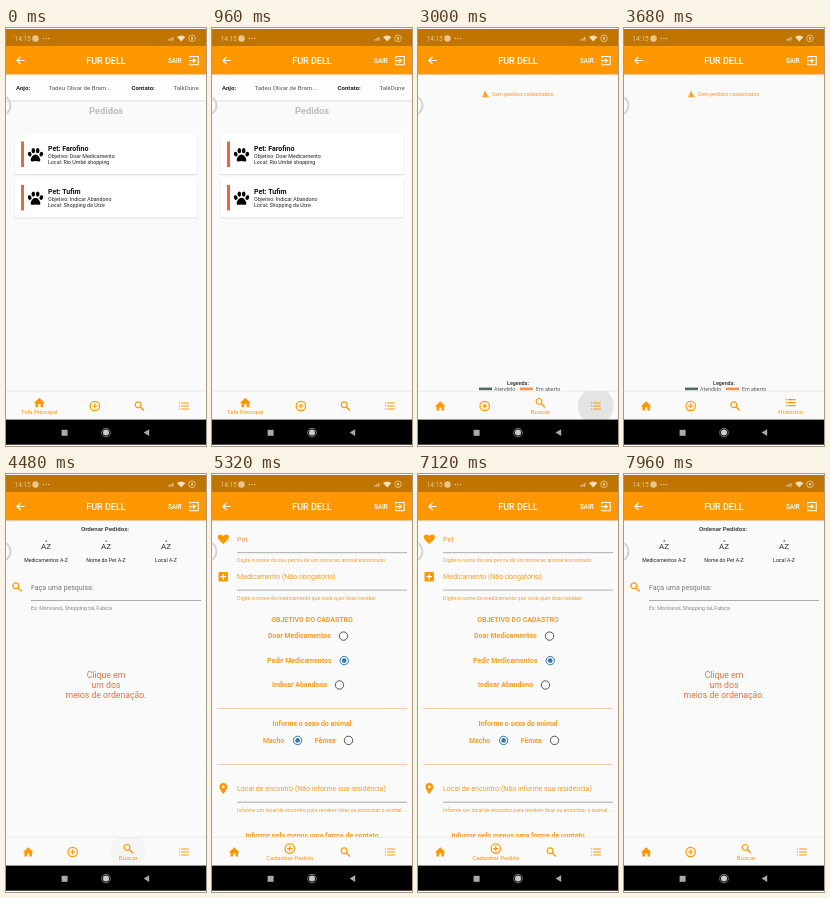
An HTML page that plays this animation: 200x418 px, repeating every 8 s.

```html
<!DOCTYPE html>
<html lang="pt-BR">
<head>
<meta charset="utf-8">
<title>Pedidos</title>
<style>
  html, body { margin: 0; width: 100%; height: 100%; overflow: hidden; background: #fafafa; }
  svg { display: block; width: 100%; height: 100%; font-family: Roboto, "Open Sans", sans-serif; }
</style>
</head>
<body>
<svg id="stage" viewBox="0 0 200 418" preserveAspectRatio="none"></svg>
<script>
const ORANGE = '#ff9800', LABEL = '#f39e25', DARK = '#222';
const LOOP = 8000;
const TABS = ['Tela Principal', 'Cadastrar Pedido', 'Buscar', 'Histórico'];
const [HOME, ADD, SEARCH, LIST] = [0, 1, 2, 3];
const TAPS = [[1360, ADD], [2080, SEARCH], [2800, LIST], [4120, SEARCH],
              [4920, ADD], [5780, HOME], [6440, ADD], [7260, SEARCH]];
const PAGE_DELAY = 160, NAV_DELAY = 210, NAV_TIME = 120;

const text = (x, y, size, str, fill = DARK, weight = 400, anchor = 'start') =>
  `<text x="${x}" y="${y}" font-size="${size}" fill="${fill}" font-weight="${weight}" text-anchor="${anchor}">${str}</text>`;
const middle = (x, y, size, str, fill, weight) => text(x, y, size, str, fill, weight, 'middle');
const rect = (x, y, w, h, fill, extra = '') =>
  `<rect x="${x}" y="${y}" width="${w}" height="${h}" fill="${fill}" ${extra}/>`;
const circle = (x, y, r, fill, extra = '') => `<circle cx="${x}" cy="${y}" r="${r}" fill="${fill}" ${extra}/>`;
const line = (d, stroke, width = 1) => `<path d="${d}" fill="none" stroke="${stroke}" stroke-width="${width}"/>`;
const at = (x, y, body) => `<g transform="translate(${x} ${y})">${body}</g>`;

const magnifier = circle(-1.2, -1.2, 2.9, 'none', `stroke="${ORANGE}" stroke-width="1.2"`) +
  line('M1 1L4.6 4.6', ORANGE, 1.4);
const icons = [
  `<path d="M-5.4 .4L0-4.8 5.4 .4H3.8V4.6H1.2V1.4H-1.2V4.6H-3.8V.4Z" fill="${ORANGE}"/>`,
  circle(0, 0, 4.7, 'none', `stroke="${ORANGE}" stroke-width="1.2"`) + line('M-2.6 0H2.6M0-2.6V2.6', ORANGE, 1.2),
  magnifier,
  line('M-2.6-3H5M-2.6 0H5M-2.6 3H5M-5-3H-3.7M-5 0H-3.7M-5 3H-3.7', ORANGE, 1.2)
];

const paw = '<ellipse cx="-5.8" cy="-.8" rx="1.8" ry="2.4" transform="rotate(-20 -5.8 -.8)"/>' +
  '<ellipse cx="-2.2" cy="-4.3" rx="1.8" ry="2.6"/><ellipse cx="2.2" cy="-4.3" rx="1.8" ry="2.6"/>' +
  '<ellipse cx="5.8" cy="-.8" rx="1.8" ry="2.4" transform="rotate(20 5.8 -.8)"/>' +
  '<path d="M0-.6C2.3-.6 5 3 4.8 5C4.5 7.5 2 6 0 6S-4.5 7.5-4.8 5C-5 3-2.3-.6 0-.6Z"/>';

const card = (y, name, goal, place) => at(0, y,
  rect(8, .8, 184, 39.4, '#e2e2e2', 'rx="1.5"') + rect(8.4, 0, 183.2, 39, '#fff', 'rx="1.5"') +
  rect(15, 6.5, 3, 25.5, '#e8663f') + at(29.5, 20, paw) +
  text(42, 15.8, 7, `Pet: ${name}`, '#111', 700) +
  text(42, 22.7, 5.3, `Objetivo: ${goal}`) + text(42, 28.7, 5.3, `Local: ${place}`));

const homePage = rect(0, 46, 200, 26.5, '#fdfdfd') + rect(0, 72.5, 200, 1, '#e0e0e0') +
  text(10, 62, 6.1, 'Anjo:', DARK, 700) + text(42.5, 62, 6.1, 'Tadeu Olivar de Bram...', '#555') +
  text(125.5, 62, 6.1, 'Contato:', DARK, 700) + text(167.5, 62, 6.1, 'TalkDune', '#555') +
  middle(100, 86.3, 9.4, 'Pedidos', '#bdbdbd', 700) +
  card(107, 'Farofino', 'Doar Medicamento', 'Rio Umbé shopping') +
  card(150.4, 'Tufim', 'Indicar Abandono', 'Shopping da Urze');

const field = (y, label, hint) => text(25, y, 7.05, label, LABEL) +
  line(`M25 ${y + 10.9}H195`, '#999', .8) + text(25, y + 20.5, 5.27, hint, LABEL);
const heading = (y, label) => middle(100, y, 6.95, label, LABEL, 700);
const radio = (x, y, on) => {
  const color = on ? '#2f78b7' : '#555';
  return circle(x, y, 4.2, 'none', `stroke="${color}" stroke-width="1"`) + (on ? circle(x, y, 2.3, color) : '');
};
const option = (x, y, label, radioX, on) => text(x, y, 6.95, label, LABEL, 700) + radio(radioX, y - 2.2, on);
const divider = y => line(`M5 ${y}H195`, '#f6c6a5', 1);

const addPage =
  `<path d="M11.3 70C3.3 64 5.5 60.6 8.3 60.6Q10.3 60.6 11.3 62.2Q12.3 60.6 14.3 60.6C17.1 60.6 19.3 64 11.3 70Z" fill="${ORANGE}"/>` +
  field(67.8, 'Pet', 'Digite o nome do seu pet ou dê um nome ao animal encontrado') +
  rect(6.5, 98, 9.5, 9.5, ORANGE, 'rx="1"') + line('M8.5 102.7H14M11.25 100V105.5', '#fff', 1.3) +
  field(105.2, 'Medicamento (Não obrigatório)', 'Digite o nome do medicamento que você quer doar/receber') +
  heading(148.3, 'OBJETIVO DO CADASTRO') +
  option(56, 164.3, 'Doar Medicamentos', 131.5) +
  option(55, 188.8, 'Pedir Medicamentos', 132.2, true) +
  option(60, 213.2, 'Indicar Abandono', 127.5) +
  divider(234.5) + heading(252.4, 'Informe o sexo do animal') +
  option(51, 268.6, 'Macho', 85.6, true) + option(102.8, 268.6, 'Fêmea', 136.5) + divider(290.5) +
  `<path fill-rule="evenodd" d="M11.3 320.2C9 317 7.4 314.8 7.4 313A3.9 3.9 0 0 1 15.2 313C15.2 314.8 13.6 317 11.3 320.2ZM11.3 311.5A1.4 1.4 0 1 0 11.4 311.5Z" fill="${ORANGE}"/>` +
  field(317.3, 'Local de encontro (Não informe sua residência)',
    'Informe um local de encontro para receber/doar ou encontrar o animal ...') +
  heading(363.5, 'Informe pelo menos uma forma de contato');

const sortButton = (x, label) => text(x - 5, 74.6, 8, 'A', '#333') + text(x + .3, 74.6, 8, 'Z', '#333') +
  `<path d="M${x - 1} 67.6L${x + .3} 66.2 ${x + 1.6} 67.6Z" fill="#333"/>` + middle(x, 88.3, 5.2, label);

const searchPage = middle(99, 57.2, 6.2, 'Ordenar Pedidos:', '#444', 700) +
  sortButton(40, 'Medicamentos A-Z') + sortButton(100, 'Nome do Pet A-Z') + sortButton(160, 'Local A-Z') +
  at(11, 113, magnifier) + text(25, 115.7, 7.05, 'Faça uma pesquisa:', '#777') +
  line('M25 126.5H195', '#999', .8) + text(25, 135.6, 5.27, 'Ex: Morivanol, Shopping tal, Fubica', '#888') +
  ['Clique em', 'um dos', 'meios de ordenação.'].map((s, i) => middle(100, 203.5 + 10.1 * i, 8.7, s, '#e8703a')).join('');

const listPage = `<path d="M63.5 69.3L66 65 67 62.3 68 65 71.5 69.3Z" fill="${LABEL}"/>` +
  line('M66 66L65 69M69 66L70 69', '#fafafa', .6) +
  text(74, 67.9, 5.3, 'Sem pedidos cadastrados.', LABEL) +
  middle(100, 357.2, 5.3, 'Legenda:', '#444', 700) +
  rect(61, 359.6, 13, 2.6, '#4d6b5b') + text(76, 363, 5.3, 'Atendido', '#555') +
  rect(102, 359.6, 13, 2.6, '#ec9550') + text(118, 363, 5.3, 'Em aberto', '#555');

const pale = '#e9c78f';
const statusBar = rect(0, 1, 200, 17.2, '#c07500') + text(8.5, 13, 6.5, '14:15', pale) +
  circle(29.5, 10.5, 3.2, pale) + [37.2, 40, 42.8].map(x => circle(x, 10.6, .75, pale)).join('') +
  [0, 1, 2].map(i => rect(162.4 + 1.9 * i, 11 - i, 1.2, 1.7 + i, pale)).join('') +
  `<path d="M171 9Q175.2 5.8 179.4 9L175.2 13.6Z" fill="#f4dfbd"/>` +
  circle(186, 10.3, 3.3, 'none', `stroke="${pale}" stroke-width=".9"`) + rect(185, 9, 2, 2.6, pale);

const header = rect(0, 46, 200, 1, '#000', 'opacity=".1"') + rect(0, 47, 200, 1, '#000', 'opacity=".04"') +
  rect(0, 18, 200, 28.3, ORANGE) +
  line('M18.5 32.5H11M14.6 28.8L10.9 32.5 14.6 36.2', '#fff', 1.2) +
  middle(100, 35.5, 9, 'FUR DELL', '#fff', 500) + text(162, 34.7, 6.3, 'SAIR', '#fff', 500) +
  line('M183.8 30.5V28.5H192.2V36.8H183.8V34.8M183 32.6H189M187 30.4L189.3 32.6 187 34.8', '#fff', 1.1);

const systemBar = rect(0, 391.6, 200, 25.1, '#000') + rect(55.6, 401.8, 6, 6, '#aaa') +
  circle(100, 404.6, 3, '#ccc') + circle(100, 404.6, 4.3, 'none', 'stroke="#999" stroke-width=".8"') +
  '<path d="M143.2 401.2V408L137.6 404.6Z" fill="#aaa"/>';

const stage = document.getElementById('stage');
stage.innerHTML = '<clipPath id="navClip"><rect y="363.5" width="200" height="28.5"/></clipPath>' +
  rect(0, 0, 200, 418, '#fafafa') +
  [homePage, addPage, searchPage, listPage].map(p => `<g class="page">${p}</g>`).join('') +
  line('M.5 69Q8.5 77.5 .5 86', '#d2d2d2', 1.8) + statusBar + header +
  rect(0, 363, 200, 29, '#fafafa') + rect(0, 362.8, 200, .7, '#e4e4e4') +
  `<g clip-path="url(#navClip)"><circle id="ripple" cy="378" fill="#000"/></g>` +
  TABS.map((label, i) => `<g class="tab"><g class="icon">${icons[i]}</g>${middle(0, 386.2, 6.1, label, ORANGE)}</g>`).join('') +
  systemBar;

const pages = [...stage.querySelectorAll('.page')];
const tabs = [...stage.querySelectorAll('.tab')];
const ripple = document.getElementById('ripple');
const clamp = v => Math.max(0, Math.min(1, v));
const ease = v => v * v * (3 - 2 * v);

function draw(t) {
  let page = HOME, weights = [1, 0, 0, 0], tap = null;
  for (const [time, tab] of TAPS) {
    if (t < time) break;
    tap = { time, tab };
    if (t >= time + PAGE_DELAY) page = tab;
    const k = ease(clamp((t - time - NAV_DELAY) / NAV_TIME));
    weights = weights.map((w, i) => w + ((i === tab ? 1 : 0) - w) * k);
  }
  pages.forEach((p, i) => p.setAttribute('display', i === page ? 'inline' : 'none'));

  // The active tab is half as wide again as the others.
  let left = 0;
  const centers = weights.map(w => {
    const width = 200 / 9 * (2 + w);
    left += width;
    return left - width / 2;
  });
  tabs.forEach((tab, i) => {
    tab.setAttribute('transform', `translate(${centers[i]} 0)`);
    tab.firstChild.setAttribute('transform', `translate(0 ${378 - 3.4 * weights[i]})`);
    tab.lastChild.setAttribute('opacity', weights[i]);
  });

  const age = tap ? t - tap.time : LOOP;
  ripple.setAttribute('cx', tap ? centers[tap.tab] : 0);
  ripple.setAttribute('r', 6 + 12 * ease(clamp(age / 200)));
  ripple.setAttribute('opacity', .09 * clamp((400 - age) / 180));
}

const start = performance.now();
function tick() {
  draw((performance.now() - start) % LOOP);
  requestAnimationFrame(tick);
}
tick();
</script>
</body>
</html>
```
